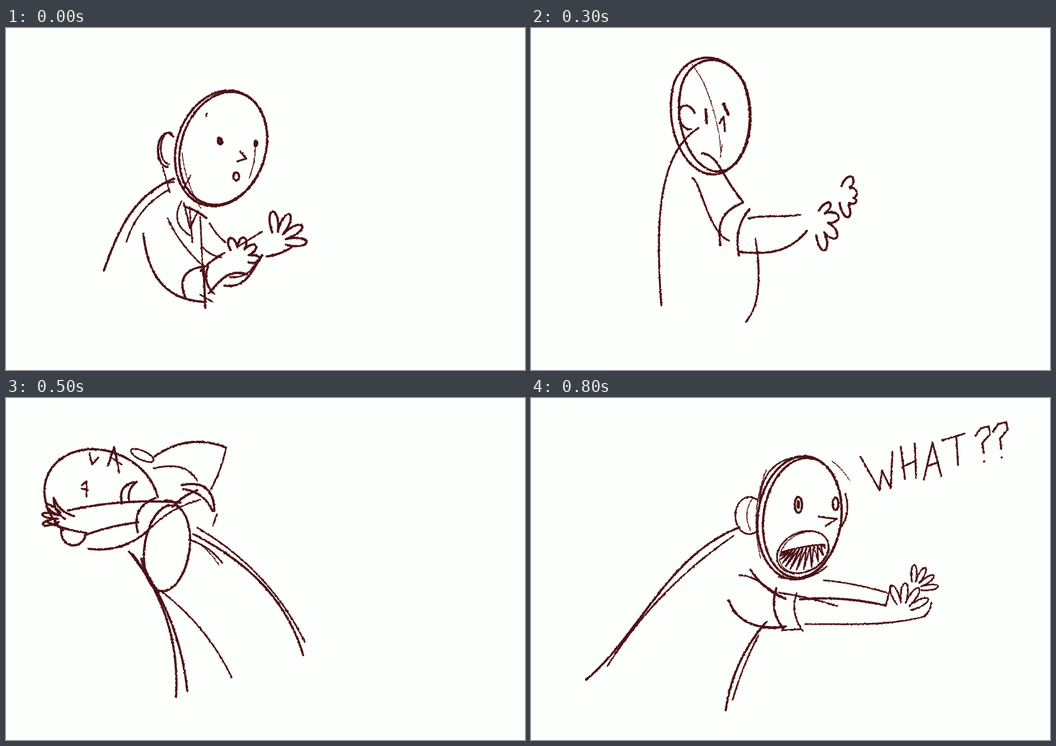
An HTML page that plays this animation: 922 px wide and 608 px high, repeating every 900 ms.

```html
<!DOCTYPE html>
<html lang="en">
<head>
<meta charset="utf-8">
<title>WHAT??</title>
<style>
  html, body { margin: 0; height: 100%; overflow: hidden; background: #fdfffc; }
  svg { display: block; width: 100vw; height: 100vh; }
  path { fill: none; stroke: #4b1217; stroke-linecap: round; stroke-linejoin: round; }
</style>
</head>
<body>
<svg viewBox="0 0 922 608" role="img" aria-label="WHAT??">
  <filter id="rough" filterUnits="userSpaceOnUse" x="0" y="0" width="922" height="608" color-interpolation-filters="sRGB">
    <feTurbulence type="fractalNoise" baseFrequency=".25" numOctaves="2" seed="4"/>
    <feDisplacementMap in="SourceGraphic" scale="3" xChannelSelector="R" yChannelSelector="G"/>
  </filter>
  <g id="stage" filter="url(#rough)"></g>
</svg>
<script>
const STEP = 100, SAMPLES = 120;
const steps = [...Array(SAMPLES + 1).keys()].map(i => i / SAMPLES);
const mix = (a, b, t) => a + (b - a) * t;
const mixPoint = (a, b, t) => [mix(a[0], b[0], t), mix(a[1], b[1], t)];

// Every stroke is sampled evenly, so any two strokes can be blended.
const stroke = (at, width = 4) => ({ width, points: steps.map(at) });
const light = s => ({ ...s, width: 3 });
const thin = s => ({ ...s, width: 1.6 });
const bold = s => ({ ...s, width: 5.5 });

// A line between two ends; each third is pushed sideways by its bend.
function arc(x1, y1, x2, y2, bend = 0, bendEnd = bend) {
  const dx = x2 - x1, dy = y2 - y1, length = Math.hypot(dx, dy);
  return stroke(t => {
    const push = 3 * t * (1 - t) * mix(bend, bendEnd, t) / length;
    return [x1 + dx * t + dy * push, y1 + dy * t - dx * push];
  });
}
function polyline(knots, width) {
  const last = knots.length - 1;
  return stroke(t => {
    const i = Math.min(Math.floor(t * last), last - 1);
    return mixPoint(knots[i], knots[i + 1], t * last - i);
  }, width);
}
const lines = text => polyline(text.split(' ').map(p => p.split(',').map(Number)), 3.4);

// Turns run clockwise from the top of the oval.
function ovalPoint(cx, cy, rx, ry, degrees, turn) {
  const tilt = degrees * Math.PI / 180, c = Math.cos(tilt), s = Math.sin(tilt);
  const x = rx * Math.sin(turn * 2 * Math.PI), y = -ry * Math.cos(turn * 2 * Math.PI);
  return [cx + x * c - y * s, cy + x * s + y * c];
}
const oval = (cx, cy, rx, ry, tilt = 0, from = 0, to = 1) =>
  stroke(t => ovalPoint(cx, cy, rx, ry, tilt, mix(from, to, t)));

// Loose construction rings that meet on the right side.
function head(cx, cy, rx, ry, tilt, gap, rings = 2) {
  return Object.fromEntries([...Array(rings).keys()].map(k => {
    const inset = gap * k;
    return ['head' + k, oval(cx + inset, cy, rx - inset, ry - inset * .6, tilt)];
  }));
}
// Fingers are petals fanned around the palm.
const hand = (x, y, direction, spread, palm, reach, fingers = 4) => stroke(t => {
  const angle = (direction + spread * (t - .5)) * Math.PI / 180;
  const r = mix(palm, reach, Math.abs(Math.sin(Math.PI * fingers * t)) ** .8);
  return [x + r * Math.cos(angle), y + r * Math.sin(angle)];
});
// An open mouth: a line of teeth with the space below it scribbled in.
function yell(cx, cy, rx, ry, tilt, inner, ink) {
  const left = .84, right = .27, turns = 24;
  const edge = turn => ovalPoint(cx, cy, rx * inner, ry * inner, tilt, turn);
  const scribble = [...Array(turns + 1).keys()].map(i => {
    const t = i / turns;
    return i % 2 ? edge(mix(left, right, t ** 1.4)) : mixPoint(edge(left), edge(right), t);
  });
  return {
    mouth: light(oval(cx, cy, rx, ry, tilt)),
    mouth2: thin(oval(cx + 2, cy, rx - 2, ry - 2, tilt - 5)),
    teeth: light(arc(...edge(left), ...edge(right), 3)),
    dark: polyline(scribble, ink)
  };
}
// Letters stand in unit cells on a rising line.
function lettering(x, y, size) {
  const rise = .24, question = ['0,.2 .15,.02 .38,.02 .42,.25 .2,.45 .24,.75', '.24,1 .26,1'];
  const letters = [
    [0, '0,0 .55,1.1 .62,.55 .87,1.12 .92,.1'],
    [1.16, '0,0 .12,.95', '.4,0 .44,1', '.04,.6 .42,.5'],
    [1.82, '0,1.1 .25,.1 .5,1.12', '.1,.74 .42,.7'],
    [2.35, '0,.1 .63,.06', '.4,.08 .45,.92'],
    [3.3, ...question],
    [3.8, ...question]
  ];
  const strokes = letters.flatMap(([start, ...shapes]) => shapes.map(shape => {
    const { points, width } = lines(shape);
    return { width, points: points.map(([u, v]) =>
      [x + (start + u) * size, y + (v - rise * (start + u)) * size]) };
  }));
  return Object.fromEntries(strokes.map((s, i) => ['text' + i, s]));
}

const surprised = {
  ...head(382, 214, 79, 105, 18, 4),
  ear: oval(287, 217, 17, 30, 0, .5, 1.1),
  ear2: light(oval(290, 214, 15, 28, 0, .5, 1.05)),
  eye: bold(oval(380, 201, 3, 5, -15)),
  eyeFar: bold(oval(444, 205, 1.5, 4)),
  nose: lines('416,219 427,232 411,237'),
  mouth: oval(409, 264, 5, 7),
  cheek: thin(arc(443, 206, 432, 267, 4)),
  jaw: thin(arc(313, 222, 346, 320, -8)),
  mark: light(arc(357, 152, 355, 157)),
  neck: light(arc(278, 246, 291, 292)),
  neck2: light(arc(328, 262, 316, 285)),
  collar: light(arc(312, 308, 327, 369, -20)),
  collar2: lines('316,312 327,356 341,325'),
  collar3: light(arc(326, 318, 331, 381)),
  collar4: arc(318, 318, 356, 338, 3),
  back: arc(298, 268, 174, 431, -40, -22),
  back2: light(arc(290, 287, 214, 380, -16)),
  back3: light(arc(299, 274, 258, 294, -8)),
  sleeveLow: arc(244, 366, 355, 487, -40, -55),
  sleeve: light(arc(287, 338, 348, 421, -7)),
  front: light(arc(345, 335, 350, 440)),
  front2: arc(351, 422, 354, 498),
  lapel: light(arc(362, 347, 390, 381, -3)),
  lapel2: light(arc(350, 390, 382, 408, -4)),
  cuff: arc(350, 424, 319, 480, -27),
  cuff2: arc(359, 424, 370, 473, -11),
  wrist: light(arc(345, 474, 367, 487)),
  armTop: arc(346, 432, 388, 400, 3),
  armLow: arc(360, 472, 428, 438, 10, 25),
  armFar: light(arc(413, 388, 455, 362)),
  armFarLow: arc(388, 458, 455, 404, -30, -8),
  palm: light(arc(398, 443, 446, 412, -14)),
  heel: arc(464, 406, 510, 388, -4),
  hand: hand(412, 410, -55, 150, 20, 39),
  handFar: hand(480, 380, -48, 130, 18, 54)
};

const bowed = {
  ...head(460, 286, 85, 100, 25, 10),
  ring: thin(oval(452, 287, 68, 86, 12, 0, .55)),
  ear: oval(429, 232, 23, 28, 0, .6, 1.32),
  ear2: light(arc(444, 204, 404, 242, -6)),
  ear3: light(arc(405, 250, 436, 254, -10)),
  eye: arc(474, 304, 483, 327),
  eyeFar: arc(492, 318, 484, 328),
  mouth: oval(433, 352, 11, 8, 20),
  nose: lines('478,352 472,370 474,378'),
  brow: bold(arc(512, 346, 524, 350)),
  chest: arc(345, 350, 410, 321, 16, 8),
  back: arc(372, 234, 193, 488, -150, -125),
  shoulder: light(arc(288, 300, 362, 290, 25, 40)),
  sleeve: arc(362, 290, 365, 394, 4, -30),
  sleeveLow: light(arc(306, 297, 321, 434, -25)),
  cuff: arc(375, 397, 308, 447, -20, -45),
  cuff2: arc(378, 412, 335, 462, -12),
  cuff3: arc(338, 465, 368, 418),
  front2: light(arc(345, 448, 356, 492)),
  armTop: light(arc(380, 420, 445, 430, -1)),
  armLow: arc(350, 476, 458, 460, -12),
  hand: hand(470, 436, -10, 230, 20, 34),
  handFar: hand(520, 412, 0, 210, 11, 32)
};

const recoiling = {
  ...head(177, 173, 80, 102, -40, 6),
  ring: thin(arc(103, 110, 265, 185, -100, -90)),
  crown: thin(arc(117, 110, 225, 120, 45)),
  jaw: light(arc(215, 110, 158, 273, 89, 161)),
  ear: oval(128, 240, 27, 23, 0, .33, 1.02),
  eye: bold(arc(147, 147, 141, 161)),
  brow: bold(arc(172, 91, 177, 115)),
  brow2: light(arc(187, 92, 178, 106)),
  nose: lines('192,137 212,101 215,133'),
  nose2: light(arc(198, 109, 221, 124)),
  lip: arc(204, 199, 246, 163, 38),
  lip2: arc(214, 204, 245, 171, 18),
  lipEnd: arc(204, 199, 214, 204),
  lipEnd2: arc(246, 163, 245, 171),
  back: light(arc(223, 268, 270, 497, 28, 36)),
  front2: arc(452, 355, 408, 553, 30, 44),
  leg: arc(456, 354, 510, 469, 13),
  sleeve: arc(246, 281, 388, 308, 40, 22),
  sleeveLow: arc(269, 342, 382, 375, 45, -27),
  cuff: arc(378, 308, 365, 374, -16),
  cuff2: arc(398, 311, 404, 387, -17),
  cuffTop: light(arc(378, 308, 400, 309)),
  lapel: light(arc(298, 223, 435, 320, 15)),
  lapel2: light(arc(288, 233, 427, 320, 8)),
  armFar: arc(325, 226, 492, 268),
  cuffFar: light(arc(444, 234, 438, 303, -20)),
  cuffFar2: light(arc(455, 250, 462, 303, -16)),
  cuffFar3: light(arc(425, 308, 468, 302)),
  armFarTop: arc(458, 271, 578, 247, -8, 10),
  armFarLow: arc(487, 293, 545, 280, 3),
  armTop: arc(393, 328, 512, 308, 8, -4),
  thumb: arc(512, 308, 572, 284, 6),
  armLow: arc(388, 363, 522, 322, -14, -36),
  hand: hand(545, 318, 25, 110, 22, 52),
  handFar: hand(570, 268, 15, 90, 18, 46, 3)
};

const flung = {
  head: oval(170, 180, 105, 85, 25, .56, 1.16),
  ear: oval(120, 238, 22, 24, 0, .3, .78),
  eye: lines('135,155 143,148 143,175'),
  eye2: light(arc(134, 161, 146, 164)),
  brow: lines('148,98 153,118 164,106'),
  nose: lines('181,121 192,87 201,132'),
  nose2: light(arc(185, 105, 205, 118)),
  lip: arc(206, 187, 232, 149, 17),
  lip2: arc(219, 185, 232, 149, 8),
  thumb: arc(85, 178, 121, 210, -8),
  thumb2: arc(85, 178, 105, 215, -8),
  finger: arc(74, 221, 143, 240, -3),
  hand: hand(106, 214, 190, 75, 14, 42, 3),
  armTop: arc(110, 200, 310, 186, 10),
  armLow: arc(140, 244, 235, 221, 4),
  jaw: arc(146, 268, 260, 228, -20),
  cuff: arc(265, 178, 234, 238, -20),
  cuff2: light(arc(262, 226, 345, 181, 8)),
  sleeve: oval(286, 267, 40, 77, 8),
  wrist: light(arc(275, 185, 308, 194, 10)),
  wrist2: arc(296, 193, 340, 164, 4),
  armFarTop: arc(264, 104, 391, 88, 23),
  armFar: light(arc(391, 88, 364, 162, 4)),
  armFarLow: light(arc(262, 125, 340, 147, 14, 24)),
  handFar: light(oval(242, 102, 22, 8, 25)),
  cuffFar: arc(312, 155, 370, 201, 30),
  cuffFar2: arc(315, 162, 367, 201, 12),
  cuffFar3: light(arc(375, 206, 367, 228)),
  back: arc(333, 242, 528, 457, 36, 46),
  back2: light(arc(340, 231, 531, 434, 28)),
  chest: light(arc(325, 252, 384, 293, 8)),
  chest2: thin(arc(345, 260, 378, 297, 3)),
  front: arc(219, 273, 302, 531, 35),
  front2: arc(225, 278, 322, 521, 25),
  front3: arc(240, 285, 271, 345, -4),
  leg: light(arc(275, 343, 401, 497, 16))
};

const shouting = {
  ...head(474, 201, 80, 116, 10, 6, 3),
  cheek: thin(arc(485, 120, 528, 235, 30)),
  ear: oval(391, 205, 22, 33),
  ear2: light(arc(395, 175, 392, 238, -12)),
  ear3: light(arc(404, 175, 420, 243, 5)),
  eye: oval(477, 192, 6.5, 12, -5),
  pupil: arc(476, 187, 478, 197),
  eyeFar: oval(537, 186, 5, 11),
  nose: lines('517,213 536,224 520,228'),
  ...yell(488, 273, 43, 27, -36, .92, 3.4),
  back: arc(375, 220, 142, 475, -65, -55),
  back2: light(arc(385, 212, 142, 470, -28)),
  front: arc(437, 302, 357, 508, -5),
  front2: arc(430, 310, 366, 530, -9),
  sleeve: arc(363, 293, 472, 340, 14, -2),
  sleeveLow: arc(321, 349, 457, 381, -11),
  sleeveLow2: light(arc(323, 363, 466, 398, -22)),
  cuff: arc(444, 335, 447, 418, -22, -26),
  cuff2: arc(481, 343, 488, 436, -22, -36),
  armTop: bold(arc(468, 354, 563, 370)),
  armTop2: arc(470, 357, 630, 375),
  armLow: arc(465, 411, 640, 410, -4, 8),
  armFar: arc(510, 318, 615, 339, 1),
  wrist: arc(648, 323, 630, 374, -30),
  palm: arc(704, 390, 637, 420, 12),
  hand: hand(660, 378, -62, 117, 18, 48),
  handFar: hand(685, 330, -52, 123, 18, 53),
  spark: arc(593, 269, 607, 262),
  spark2: arc(585, 286, 600, 285),
  spark3: arc(579, 308, 588, 312),
  ...lettering(594, 115, 57)
};

const pleading = {
  ...head(477, 213, 74, 110, 8, 5),
  crown: light(arc(406, 185, 490, 103, 36)),
  headThin: thin(arc(418, 128, 408, 285, -17)),
  headThin2: thin(arc(535, 112, 566, 147, 3)),
  earFar: light(arc(558, 170, 552, 228, 9)),
  chin: light(arc(440, 318, 525, 300, -15)),
  ear: light(oval(388, 209, 25, 33, 0, .4, 1.1)),
  ear2: thin(arc(395, 177, 390, 235, -12)),
  eye: oval(475, 190, 6.5, 14),
  pupil: bold(arc(475, 184, 475, 194)),
  eyeFar: oval(541, 188, 5, 11),
  nose: lines('511,211 543,215 524,227'),
  ...yell(483, 274, 48, 35, -25, .85, 2.8),
  back: arc(370, 230, 98, 501, -55, 10),
  back2: light(arc(360, 245, 136, 476, -22)),
  front: arc(418, 398, 346, 555, -17),
  front2: light(arc(404, 422, 358, 537, -4)),
  sleeve: light(arc(370, 315, 450, 355, 14, -2)),
  shoulder: arc(390, 305, 452, 357, -9),
  sleeveLow: arc(351, 360, 452, 406, -34, -22),
  sleeveLow2: light(arc(358, 378, 450, 408, -16)),
  cuff: arc(436, 338, 448, 410, -13),
  cuff2: light(arc(472, 347, 483, 414, -12)),
  cuff3: light(arc(445, 413, 480, 411)),
  armTop: light(arc(440, 346, 544, 370, 3)),
  armTop2: arc(478, 358, 630, 369, 8),
  armLow: light(arc(487, 402, 700, 388, -4, -14)),
  armFar: light(arc(520, 324, 635, 347, 4)),
  wrist: light(arc(640, 333, 630, 369)),
  palm: light(arc(711, 364, 698, 388, 4)),
  hand: light(hand(660, 380, -70, 116, 16, 51)),
  handFar: light(hand(680, 340, -48, 110, 14, 43)),
  ...lettering(585, 104, 62)
};

// Blends the strokes two poses share; lift raises the upper body in an arc.
function between(a, b, { lift = 0, textAmount = .5 } = {}) {
  const shared = Object.keys(a).filter(name => name in b);
  return Object.fromEntries(shared.map(name => {
    const amount = name.startsWith('text') ? textAmount : .5;
    const points = a[name].points.map((p, i) => {
      const [x, y] = mixPoint(p, b[name].points[i], amount);
      return [x, y - lift * Math.min(1, Math.max(0, (490 - y) / 300))];
    });
    return [name, { points, width: mix(a[name].width, b[name].width, .5) }];
  }));
}

const sequence = [
  surprised, between(surprised, bowed), bowed, between(bowed, recoiling, { lift: 92 }),
  recoiling, flung, shouting, between(shouting, pleading, { textAmount: 1.8 }), pleading
].map(strokes => Object.values(strokes).map(({ width, points }) =>
  `<path stroke-width="${width}" d="M${points.map(p => p.map(v => v.toFixed(1))).join('L')}"/>`).join(''));

const stage = document.getElementById('stage');
let shown = -1;
function play() {
  const index = Math.floor(performance.now() / STEP) % sequence.length;
  if (index !== shown) stage.innerHTML = sequence[shown = index];
  requestAnimationFrame(play);
}
play();
</script>
</body>
</html>
```
